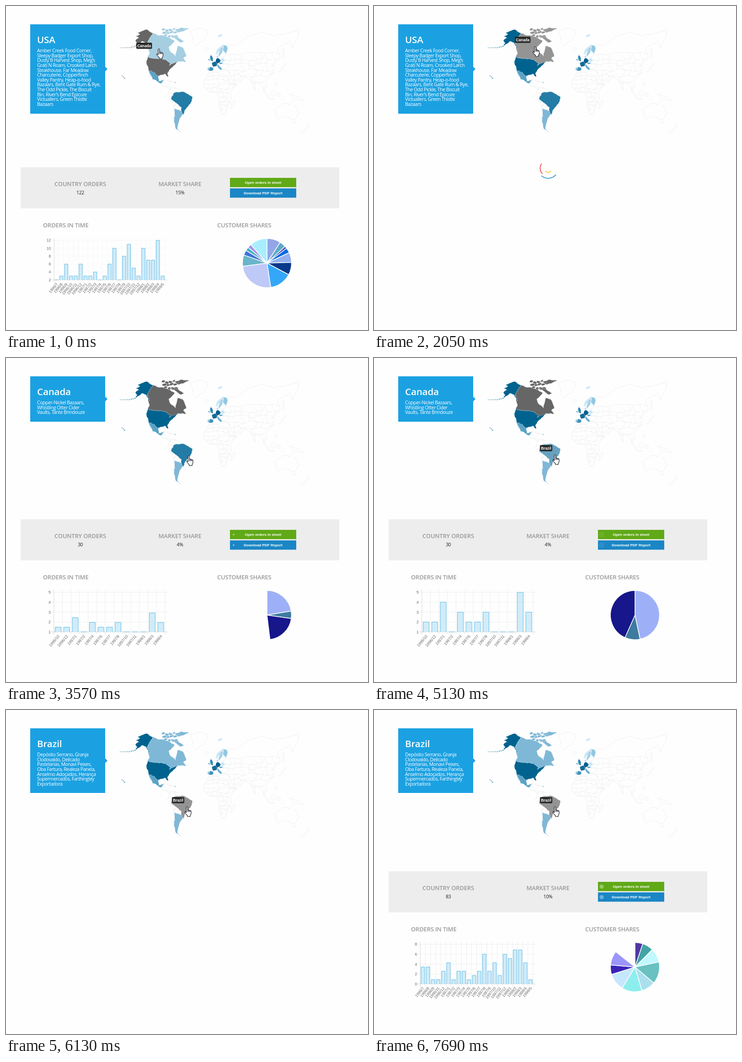
Animation of 792x707 px, one loop 8 s. Source, as an HTML page with a canvas:

```html
<!DOCTYPE html>
<html lang="en">
<head>
<meta charset="utf-8">
<title>Customer map dashboard</title>
<style>
html, body { margin: 0; width: 100%; height: 100%; overflow: hidden; background: #fefefe; }
canvas { display: block; }
</style>
</head>
<body>
<canvas id="stage" width="792" height="707"></canvas>
<script>
const ctx = document.getElementById('stage').getContext('2d');
const LOOP = 8000;
const TAU = Math.PI * 2;
const SANS = '"Open Sans", sans-serif';
const ARIAL = '"Liberation Sans", Arial, sans-serif';

const clamp = v => Math.min(1, Math.max(0, v));
const easeOut = (t, power) => 1 - (1 - clamp(t)) ** power;

function hash(x, y) {
  const v = Math.sin(x * 12.9898 + y * 78.233) * 43758.5453;
  return v - Math.floor(v);
}

// Midpoint displacement that depends on place only, so neighbours share their border.
function roughen(path, [ax, ay], [bx, by]) {
  const length = Math.hypot(bx - ax, by - ay);
  if (length < 3.5) return path.lineTo(bx, by);
  const x = (ax + bx) / 2, y = (ay + by) / 2, wobble = Math.min(length * .22, 2);
  const mid = [x + (hash(x, y) - .5) * wobble, y + (hash(y, x) - .5) * wobble];
  roughen(path, [ax, ay], mid);
  roughen(path, mid, [bx, by]);
}

function outline(points) {
  const path = new Path2D();
  path.moveTo(...points[0]);
  points.forEach((p, i) => roughen(path, p, points[(i + 1) % points.length]));
  path.closePath();
  return path;
}

const land = text => outline(text.split(' ').map(pair => pair.split(',').map(Number)));

function island(x, y, rx, ry, tilt = 0) {
  const points = Array.from({ length: 9 }, (_, i) => {
    const a = i / 9 * TAU, r = .8 + .4 * hash(x + i, y);
    const u = Math.cos(a) * rx * r, v = Math.sin(a) * ry * r;
    return [x + u * Math.cos(tilt) - v * Math.sin(tilt), y + u * Math.sin(tilt) + v * Math.cos(tilt)];
  });
  return outline(points);
}

function join(...paths) {
  const all = new Path2D();
  paths.forEach(path => all.addPath(path));
  return all;
}

const scatter = (count, place) => join(...Array.from({ length: count }, (_, i) => island(...place(i, hash(i, 3), hash(i, 8)))));

// Irregular brick net, used as inner borders of a continent.
function borderNet(x, y, cols, rows, size) {
  const path = new Path2D();
  const node = (i, j) => [
    x + (i + j % 2 / 2 + (hash(i, j) - .5) * .7) * size,
    y + (j + (hash(j + 5, i) - .5) * .7) * size * .85,
  ];
  const edge = (a, b) => { path.moveTo(...a); roughen(path, a, b); };
  for (let j = 0; j < rows; j++) {
    for (let i = 0; i < cols; i++) {
      edge(node(i, j), node(i + 1, j));
      if (hash(i, j + 9) > .25) edge(node(i, j), node(i, j + 1));
    }
  }
  return path;
}

const regions = {
  canada: join(
    land('321,59 355,68 369,77 356,90 360,100 371,109 376,87 386,90 395,109 388,114 394,122 379,121 357,130 359,124 350,117 310,111 314,103 309,80'),
    land('366,51 385,47 401,49 392,53 378,58'),
    land('361,66 371,64 390,77 382,80 373,73'),
    scatter(13, (i, u, v) => [344 + i * 2.6, 50 + i % 3 * 6.5 + u * 4, 3.4 + v * 2, 2.2 + u, u - .5]),
  ),
  usa: join(
    land('308,51 321,59 309,80 314,94 306,80 298,77 283,87 287,81 283,75 291,69 284,66 293,62 287,58'),
    land('310,111 350,117 359,124 357,130 378,120 362,135 353,147 355,155 348,148 333,153 312,141 307,122'),
    scatter(9, i => [250 + i * 4, 91 - Math.max(0, i - 5), .9 + i * .1, .8]),
    scatter(3, i => [254 + i * 2.8, 152.5 + i * 2.6, 1 + i * .3, .9]),
    island(370, 166.5, 1.2, .7),
  ),
  mexico: land('312,141 325,145 333,153 335,164 347,160 340,169 321,160 314,147 318,158'),
  brazil: land('367,190 388,187 408,198 404,212 391,228 388,237 383,233 384,222 373,212 361,203 363,197'),
  argentina: join(land('369,224 384,229 386,238 379,250 375,267 378,273 371,267 368,248'), island(380, 274, 2, .8)),
};

const europe = [
  ['#c9e8f8', island(468, 65, 6, 2.6, -.3)],
  ['#c6e5f5', island(467, 95, 15, 3, -.86)],
  ['#a4d1e8', island(470, 100, 11, 3.3, -1.2)],
  ['#91c7e1', island(479.5, 94, 4.6, 8.5)],
  ['#3988af', island(450, 115, 3, 7, -.25)],
  ['#8ec4df', island(444.5, 117, 2.2, 2.6)],
  ['#176a99', island(456, 127, 6, 5.8)],
  ['#98cbe4', island(462.5, 111, 1.5, 2.5)],
  ['#cae8f7', island(474.5, 118, 5, 4)],
  ['#00608f', island(464, 120, 4.8, 6)],
  ['#4394ba', island(449, 137, 5.4, 4.5)],
  ['#7cb6d3', island(442.5, 137, 1.5, 4)],
  ['#68b0d1', island(467, 134, 2.2, 8, -.7)],
  ['#3e91b8', island(470, 125, 3.8, 1.5)],
];

const continents = [
  [land('338,170 346,164 354,176 366,177 388,187 367,190 361,203 373,212 369,224 384,229 371,267 366,240 367,219 353,197 358,181'), borderNet(340, 165, 6, 8, 10)],
  [land('443,146 463,143 471,150 482,151 493,171 504,170 491,190 492,204 479,234 473,238 465,210 467,200 462,188 444,188 432,174 433,163'), borderNet(428, 142, 7, 11, 11)],
  [land('485,84 498,85 515,80 530,66 560,57 589,65 641,53 639,68 626,93 621,77 594,92 600,112 586,130 584,148 569,161 572,178 564,174 565,184 560,170 546,168 543,179 534,160 514,153 519,160 500,172 487,144 474,139 492,130 473,125 480,104 485,98'), borderNet(470, 104, 9, 6, 14)],
];

const farLand = join(
  land('403,53 425,48 443,53 437,69 420,84 414,87 408,70'),
  land('589,226 607,212 621,216 626,208 641,234 632,248 612,240 592,246'),
  land('620,192 641,198 653,206 628,203'),
  island(438, 93, 5, 2.5), island(496, 215, 2.6, 10, .3),
  island(661, 260, 2.5, 5, -.4), island(650, 273, 9, 2, -.6), island(631, 254, 2, 1.8),
  island(605, 135, 2.5, 11, .6), island(607, 103, 1.2, 10, -.1),
  island(569, 191, 2, 10, -.6), island(585, 191, 6, 6), island(581, 203, 6, 1),
  island(597, 193, 3, 4), island(591, 170, 2, 5, -.2), island(545, 181, 1.3, 2.2),
  island(359, 164, 7, 1, .2), island(369, 167.5, 3, 1),
  scatter(9, (i, u, v) => [640 + i * 4.5, 206 + u * 40, .4, .4]),
);

const baseFills = { usa: '#00638f', canada: '#7fb8d6', mexico: '#5ba3c5', brazil: '#237ca5', argentina: '#7fb8d6' };

const panels = {
  usa: ['USA', ['Amber Creek Food Corner,', 'Sleepy Badger Export Shop,', 'Dusty B Harvest Shop, Meg\u2019s',
    'Grab N Roam, Crooked Larch', 'Steakhouse, Far Meadow', 'Charcuterie, Copperfinch',
    'Valley Pantry, Heap-o-food', 'Bazaars, Bent Gate Rum & Rye,', 'The Odd Pickle, The Biscuit',
    'Bin, River\u2019s Bend Epicure', 'Victuallers, Green Thistle', 'Bazaars']],
  canada: ['Canada', ['Copper-Nickel Bazaars,', 'Whistling Otter Cider', 'Vaults, Tante Brindouze']],
  brazil: ['Brazil', ['Dep\u00f3sito Serrano, Granja', 'Clodovaldo, Delicado', 'Pastelarias, Monavi Peixes,',
    'Oba Fartura, Realeza Panela,', 'Anselmo Ado\u00e7ados, Heran\u00e7a', 'Supermercados, Farthingley', 'Exportadora']],
};

// "months" counts orders per month from July 1996; a zero month has no bar.
const reports = {
  usa: {
    share: '15%', left: 105.3, low: 2, high: 12, tick: 2, grid: '#f5f5f5',
    months: [2, 3, 6, 3, 3, 6, 3, 3, 4, 2, 3, 6, 10, 2, 8, 11, 5, 3, 10, 7, 7, 12, 3],
    slices: [[11, '#94a6e7'], [5, '#5eabc4'], [2, '#4d54b5'], [4, '#096be5'], [8, '#94b0ee'], [10, '#08398a'], [18, '#35a7f8'],
      [31, '#bfc9f8'], [9, '#69b5ca'], [4, '#3d74dc'], [3, '#48b1c8'], [3, '#a48ff0'], [14, '#a8eeff']],
  },
  canada: {
    share: '4%', left: 104.7, low: 1, high: 5, tick: 1, grid: '#e8e8e8',
    months: [0, 0, 0, 2, 0, 2, 4, 1, 0, 3, 0, 2, 2, 3, 0, 1, 1, 0, 1, 0, 5, 3, 0],
    slices: [[14, '#9db0f7'], [3, '#3d7b9f'], [13, '#17168b']],
  },
  brazil: {
    share: '10%', left: 101.2, low: 0, high: 8, tick: 2, grid: '#e8e8e8',
    months: [4, 4, 1, 0, 1, 3, 5, 1, 3, 3, 1, 2, 3, 7, 3, 5, 2, 7, 6, 8, 8, 5, 1],
    slices: [[5, '#5038a2'], [7, '#42a4a5'], [9, '#c1f8fe'], [14, '#69c1c1'], [9, '#aae0ed'], [13, '#8eeeee'],
      [11, '#c6e7fe'], [6, '#3924b7'], [9, '#9b96fb']],
  },
};

// The screen refreshes only at these times; each step lists what changes.
// "start" and "pulse" are when the charts and the button dots began to grow.
const steps = [
  { at: 0, panel: 'usa', report: 'usa', start: -1000, pulse: 0, fills: { usa: '#666', canada: '#a5cee1' },
    tip: ['Canada', 285, 80], cursor: ['hand', 329, 93] },
  { at: 500, tip: ['Canada', 301, 67], cursor: ['hand', 337, 86] },
  { at: 1030, pulse: 950 },
  { at: 1550, cursor: ['arrow', 343.5, 86.5] },
  { at: 2050, report: null, spin: 0, fills: { canada: '#949494' }, tip: ['Canada', 308, 67], cursor: ['hand', 347, 88] },
  { at: 2550, spin: 180, tip: ['Canada', 314, 71], cursor: ['hand', 351, 91] },
  { at: 3050, panel: 'canada', spin: null, fills: { canada: '#666' }, tip: null, cursor: ['arrow', 366, 96] },
  { at: 3570, report: 'canada', start: 3419, pulse: 3419, cursor: ['hand', 394.5, 213] },
  { at: 4100, fills: { canada: '#666', brazil: '#66a2c0' }, tip: ['Brazil', 363, 190], cursor: ['hand', 390.5, 210.5] },
  { at: 4630 },
  { at: 5130 },
  { at: 5630, report: null, spin: 0, fills: { brazil: '#949494' } },
  { at: 6130, panel: 'brazil', spin: null },
  { at: 7190, report: 'brazil', start: 7305, pulse: 7190 },
  { at: 7690 },
];

const hand = new Path2D('M4 2Q4 .5 5.5 .5T7 2V8Q8.5 7 9.5 8.5Q11 7.7 12 9.3Q14 8.7 14.5 10.5V15Q14.3 18 12.5 20V22H6.5V20Q4 17.5 1 13.5Q.3 12 1.7 11.6Q3 11.8 4 13Z');
const knuckles = new Path2D('M7 8V12M9.5 8.5V12M12 9.3V12');
const arrow = new Path2D('M0 0V16.5L3.8 13L6.3 18.8L8.8 17.7L6.4 12H11.3Z');

function text(str, x, y, font, color, align = 'left', spacing = 0) {
  ctx.font = font;
  ctx.fillStyle = color;
  ctx.textAlign = align;
  ctx.letterSpacing = spacing + 'px';
  ctx.fillText(str, x, y);
}

function rect(x, y, w, h, color) {
  ctx.fillStyle = color;
  ctx.fillRect(x, y, w, h);
}

function polyline(...points) {
  ctx.beginPath();
  points.forEach(p => ctx.lineTo(...p));
  ctx.stroke();
}

function drawPanel([title, lines]) {
  const h = Math.round(66.7 + lines.length * 10.67), mid = 40 + h / 2;
  rect(53, 40, 164, h, '#1ba1e2');
  ctx.fill(new Path2D(`M217 ${mid - 5}l5 5l-5 5Z`));
  text(title, 68, 81, '600 20.5px ' + SANS, '#fff', 'left', -.1);
  lines.forEach((str, i) => text(str, 68, 101 + i * 10.64, '500 10.5px ' + SANS, '#fff', 'left', -.45));
}

function drawMap(fills) {
  ctx.lineJoin = 'round';
  ctx.lineWidth = .6;
  ctx.strokeStyle = '#e6e6e6';
  ctx.stroke(farLand);
  for (const [shape, net] of continents) {
    ctx.stroke(shape);
    ctx.save();
    ctx.clip(shape);
    ctx.stroke(net);
    ctx.restore();
  }
  ctx.strokeStyle = 'rgba(255,255,255,.8)';
  ctx.lineWidth = .4;
  const countries = Object.keys(regions).map(name => [fills[name] || baseFills[name], regions[name]]);
  for (const [color, shape] of [...europe, ...countries]) {
    ctx.fillStyle = color;
    ctx.fill(shape);
    ctx.stroke(shape);
  }
}

function drawBars({ months, left, low, high, tick, grid }, grow) {
  const bars = months.map((count, i) => ({ count, label: `${1996 + Math.floor((i + 6) / 12)}/${(i + 6) % 12 + 1}` }))
    .filter(bar => bar.count);
  const step = (348 - left) / bars.length, base = 597.7, unit = 86.4 / (high - low);
  ctx.lineWidth = .7;
  ctx.strokeStyle = grid;
  for (let v = low; v <= high; v += tick) {
    const y = base - (v - low) * unit;
    polyline([left - 6, y], [353, y]);
    text(v, left - 7, y + 3, '8.5px ' + ARIAL, '#666', 'right');
  }
  bars.forEach((_, i) => polyline([left + (i + 1) * step, 506], [left + (i + 1) * step, 604]));
  ctx.strokeStyle = '#c9c9c9';
  polyline([left, 506], [left, 604]);
  polyline([left - 6, base], [353, base]);

  bars.forEach(({ count, label }, i) => {
    const x = left + (i + .5) * step, half = step * .345, top = base - (count - low) * unit * grow;
    rect(x - half, top, half * 2, base - top, '#d1ecf9');
    ctx.strokeStyle = '#4db5e6';
    ctx.lineWidth = .9;
    polyline([x - half, base], [x - half, top], [x + half, top], [x + half, base]);
    ctx.save();
    ctx.translate(x + 2, 606);
    ctx.rotate(-50 / 360 * TAU);
    text(label, 0, 2, '8.5px ' + ARIAL, '#666', 'right');
    ctx.restore();
  });
}

function drawPie(slices, total, grow) {
  if (!grow) return;
  let from = -TAU / 4;
  ctx.strokeStyle = '#fff';
  ctx.lineWidth = 1.5;
  for (const [count, color] of slices) {
    const to = from + count / total * TAU * grow;
    ctx.beginPath();
    ctx.moveTo(571, 561);
    ctx.arc(571, 561, 53.7, from, to);
    ctx.closePath();
    ctx.fillStyle = color;
    ctx.fill();
    ctx.stroke();
    from = to;
  }
}

function drawButton(label, y, color, age) {
  rect(490, y, 145, 20.3, color);
  ctx.fillStyle = `rgba(255,255,255,${Math.max(.07, .65 * (1 - age))})`;
  ctx.beginPath();
  ctx.arc(498, y + 10.2, 6.5 * easeOut(age, 2), 0, TAU);
  ctx.fill();
  text(label, 562.5, y + 13, 'bold 8px ' + ARIAL, '#fff', 'center');
}

function drawReport(report, { at, start, pulse }) {
  const heading = (str, x, y, align) => text(str, x, y, '600 13px ' + SANS, '#999', align, -.2);
  const figure = (str, x) => text(str, x, 411, '10.5px ' + SANS, '#222', 'center', -.4);
  const total = report.slices.reduce((sum, [count]) => sum + count, 0);
  const grow = easeOut((at - start) / 1000, 4), age = (at - pulse) / 1100;
  rect(32, 352, 697, 89.5, '#ededed');
  heading('COUNTRY ORDERS', 162.5, 393, 'center');
  heading('MARKET SHARE', 380.5, 393, 'center');
  figure(total, 162.5);
  figure(report.share, 380.5);
  drawButton('Open orders in sheet', 375, '#60a917', age);
  drawButton('Download PDF Report', 398, '#1b86c5', age);
  heading('ORDERS IN TIME', 81, 483);
  heading('CUSTOMER SHARES', 462, 483);
  drawBars(report, grow);
  drawPie(report.slices, total, grow);
}

function drawLoader(spin) {
  const arc = (color, r, middle, sweep, turn) => {
    const a = (middle + turn) / 360 * TAU, half = sweep / 720 * TAU;
    ctx.strokeStyle = color;
    ctx.beginPath();
    ctx.arc(381, 354, r, a - half, a + half);
    ctx.stroke();
  };
  ctx.lineWidth = 2;
  arc('#4a9fd8', 22, 85, 92, spin);
  arc('#ee5f55', 17.5, 175, 80, -spin / 2);
  arc('#f6cb45', 9, 88, 95, spin / 2);
}

function drawTip([label, x, y]) {
  ctx.font = 'bold 8.3px ' + ARIAL;
  ctx.letterSpacing = '0px';
  const w = ctx.measureText(label).width + 4.5;
  ctx.fillStyle = '#292929';
  ctx.beginPath();
  ctx.roundRect(x, y, w, 13.5, 2.5);
  ctx.fill();
  text(label, x + w / 2, y + 9.6, ctx.font, '#fff', 'center');
}

function drawCursor([kind, x, y]) {
  const shape = kind === 'hand' ? hand : arrow;
  ctx.save();
  ctx.translate(x, y);
  ctx.fillStyle = '#fff';
  ctx.strokeStyle = '#1a1a26';
  ctx.lineWidth = 1.2;
  ctx.fill(shape);
  ctx.stroke(shape);
  if (kind === 'hand') ctx.stroke(knuckles);
  ctx.restore();
}

function frame(now) {
  const state = Object.assign({ spin: null }, ...steps.filter(step => step.at <= now % LOOP));
  rect(0, 0, 792, 707, '#fefefe');
  drawPanel(panels[state.panel]);
  drawMap(state.fills);
  if (state.report) drawReport(reports[state.report], state);
  if (state.spin !== null) drawLoader(state.spin);
  if (state.tip) drawTip(state.tip);
  drawCursor(state.cursor);
  requestAnimationFrame(frame);
}
requestAnimationFrame(frame);
</script>
</body>
</html>
```
